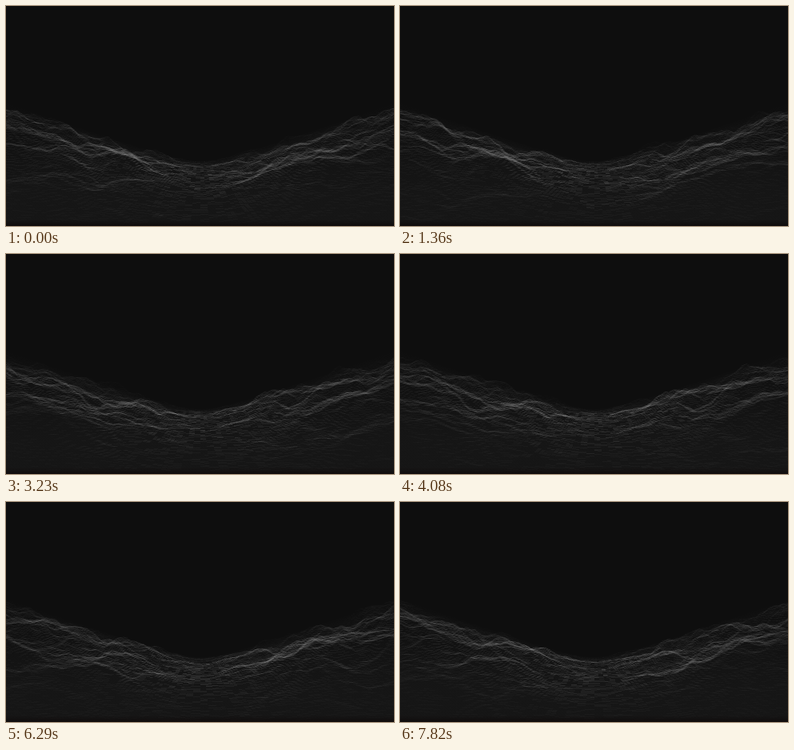
Write an HTML page with a canvas that moves like this. It is 485 px wide and 275 px high and loops after 7990 ms.

```html
<!DOCTYPE html>
<html lang="en">
<head>
<meta charset="utf-8">
<title>Valley</title>
<style>
  html, body { margin: 0; width: 100%; height: 100%; overflow: hidden; background: #0e0e0e; }
  canvas { display: block; width: 100%; height: 100%; }
</style>
</head>
<body>
<canvas id="stage" width="485" height="275"></canvas>
<script>
const W = 485, H = 275, CX = 243;
const LOOP = 7990, STEP = 170;
const HORIZON = 169, EYE = 25;      // eye height in pixels at unit depth
const SPEED = 0.085;                // depth travelled per second
const ROW = 0.004, COL = 1.5;       // grid spacing
const ctx = document.getElementById('stage').getContext('2d');

// Crests: across, depth, height
const CRESTS = [[68, 1.07, 6], [-57, 0.86, 5], [107, 0.67, 6], [-55, 0.53, 5]];

const clamp = v => Math.max(0, Math.min(1, v));
const smooth = v => v * v * (3 - 2 * v);

function hash(x, y) {
  let h = Math.imul(x, 374761393) ^ Math.imul(y, 668265263);
  h = Math.imul(h ^ (h >>> 13), 1274126177);
  h = Math.imul(h ^ (h >>> 15), 2246822519);
  return ((h ^ (h >>> 16)) >>> 0) / 4294967296;
}

function noise(x, y) {
  const ix = Math.floor(x), iy = Math.floor(y);
  const u = smooth(x - ix), v = smooth(y - iy);
  const a = hash(ix, iy), b = hash(ix + 1, iy);
  const c = hash(ix, iy + 1), d = hash(ix + 1, iy + 1);
  return 2 * (a + (b - a) * u + (c - a + (a - b - c + d) * u) * v) - 1;
}

// Round floor, straight flanks
const valley = x => 0.343 * (Math.hypot(x, 35) - 35);

function relief(x, z) {
  const u = x / 25 + 40, v = (z - 0.0007 * Math.abs(x)) / 0.095 + 7;
  let n = 0;
  for (let octave = 0, size = 1, weight = 1; octave < 4; octave++, size *= 2.1, weight *= 0.47) {
    n += weight * noise(u * size, v * size);
  }
  n *= 1 + 5.8 * smooth(clamp(Math.abs(x) / 75));
  for (const [cx, cz, height] of CRESTS) {
    const d = ((x - cx) / 13) ** 2 + ((z - cz) / 0.035) ** 2;
    if (d < 6) n += height * Math.exp(-d);
  }
  return n;
}

function drawBackdrop() {
  ctx.globalAlpha = 1;
  ctx.fillStyle = '#0e0e0e';
  ctx.fillRect(0, 0, W, H);

  const ground = ctx.createLinearGradient(0, 115, 0, H);
  ground.addColorStop(0, '#0f0f0f');
  ground.addColorStop(0.35, '#131313');
  ground.addColorStop(0.75, '#171717');
  ground.addColorStop(1, '#171717');
  ctx.fillStyle = ground;
  ctx.globalAlpha = 0.3;
  for (let scale = 1; scale < 1.5; scale += 0.07) {
    ctx.beginPath();
    ctx.moveTo(0, H);
    for (let x = 0; x <= W; x += 5) {
      ctx.lineTo(x, HORIZON + (EYE - valley((x - CX) / scale)) * scale);
    }
    ctx.lineTo(W, H);
    ctx.fill();
  }
}

function drawRow(row, travelled) {
  const worldZ = row * ROW, scale = 1 / (worldZ - travelled);
  const strength = 0.046 * Math.min(scale, 2) * Math.min(1, (2.2 / scale) ** 1.5);
  const last = Math.ceil(250 / scale / COL);
  for (let col = -last; col < last; col++) {
    const x = col * COL, side = Math.abs(x);
    if (hash((col >> 1) + 500, row + 900) > 0.32 + 0.48 * clamp(side / 70)) continue;
    const edge = clamp(side * scale / CX);
    const fog = smooth(clamp((scale - 0.96 - 0.12 * edge) / 0.38));
    if (fog === 0) continue;
    const left = Math.floor(CX + x * scale);
    const right = Math.floor(CX + (x + COL) * scale);
    const y = HORIZON + (EYE - valley(x) - relief(x, worldZ)) * scale;
    if (y > H || right < 0 || left > W) continue;
    ctx.globalAlpha = strength * fog * (1 - 0.45 * edge);
    ctx.fillRect(left, Math.round(y), right - left, 1);
  }
}

function draw(ms) {
  drawBackdrop();
  const travelled = SPEED * ms / 1000;
  ctx.fillStyle = '#a0a0a0';
  const near = Math.ceil((travelled + 0.18) / ROW);
  const far = Math.floor((travelled + 1.04) / ROW);
  for (let row = far; row >= near; row--) drawRow(row, travelled);

  ctx.globalAlpha = 1;
  const base = ctx.createLinearGradient(0, 267, 0, H);
  base.addColorStop(0, 'rgba(16,12,12,0)');
  base.addColorStop(1, '#100c0c');
  ctx.fillStyle = base;
  ctx.fillRect(0, 267, W, H - 267);
}

const start = performance.now();
let shown = -1;
function tick() {
  const elapsed = (performance.now() - start) % LOOP;
  const pose = Math.floor(elapsed / STEP);
  if (pose !== shown) {
    shown = pose;
    draw(pose * STEP);
  }
  requestAnimationFrame(tick);
}
tick();
</script>
</body>
</html>
```
